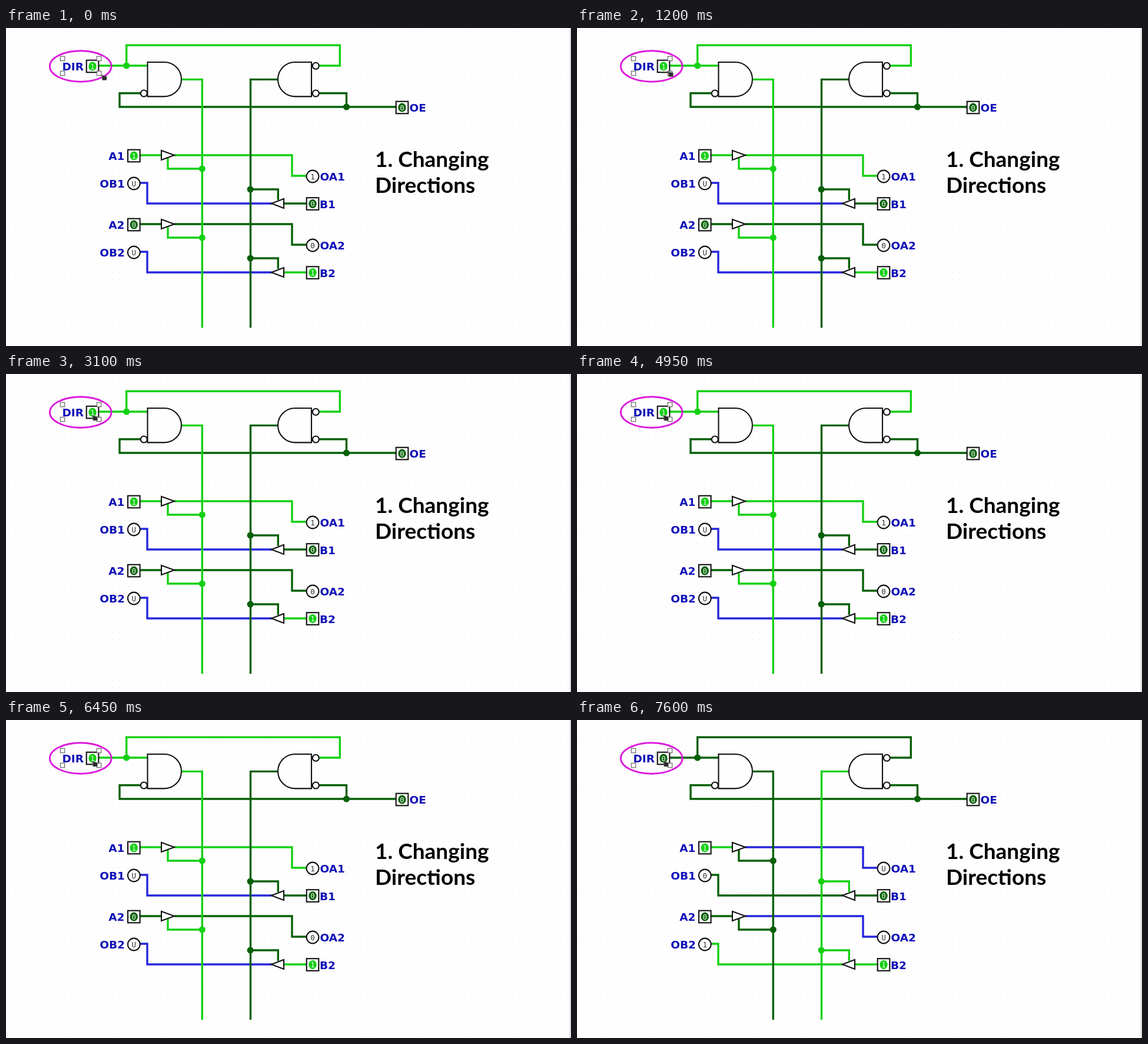
Animation of 960x540 px, one loop 8 s. Source, as an HTML page:

```html
<!DOCTYPE html>
<html lang="en">
<head>
<meta charset="utf-8">
<title>Bus transceiver</title>
<style>
  html, body { margin: 0; width: 100%; height: 100%; overflow: hidden; background: #fefefe; }
  svg { display: block; width: 960px; height: 540px; }
  .wire { fill: none; stroke-width: 3.4; }
  .part { fill: #fefefe; stroke: #111; stroke-width: 2.1; }
  .label { font: bold 18.5px "DejaVu Sans", sans-serif; fill: #1010b8; }
  .value { font: 12.5px "DejaVu Sans Mono", monospace; text-anchor: middle; }
  .title { font: bold 37px Lato, sans-serif; fill: #000; }
</style>
</head>
<body>
<svg viewBox="0 0 960 540">
  <defs>
    <pattern id="grid" x="-.7" y="-.6" width="11.72" height="11.72" patternUnits="userSpaceOnUse">
      <rect x="5.2" y="5.2" width="1.3" height="1.3" fill="#ececec"/>
    </pattern>
  </defs>
  <rect width="960" height="540" fill="url(#grid)"/>
  <rect x="957.5" width="2.5" height="540" fill="#dedede"/>
  <g id="circuit"></g>
  <ellipse cx="126.7" cy="65" rx="52.3" ry="26.2" fill="none" stroke="#dc1cdc" stroke-width="3"/>
  <g id="handles" fill="#fefefe" stroke="#666" stroke-width="1.2"></g>
  <path id="cursor" d="M-4.5 -5L-1 -3.5L4 -2.5V4H-3.5V0Z" fill="#2b2b2b" stroke="#777" stroke-width=".7"/>
  <g class="title">
    <text x="627" y="235.5">1. Changing</text>
    <text x="627" y="279.5">Directions</text>
    <rect x="721" y="260.5" width="11" height="4.2"/>
  </g>
</svg>
<script>
const LOOP = 8000, TOGGLE = 6500;
const COLORS = { 0: '#066006', 1: '#14d014', U: '#2626dc' };
const byId = id => document.getElementById(id);

const wire = (value, d) => `<path class="wire" stroke="${COLORS[value]}" d="${d}"/>`;
const dot = (value, x, y) => `<circle cx="${x}" cy="${y}" r="5.6" fill="${COLORS[value]}"/>`;
const part = d => `<path class="part" d="${d}"/>`;
const bubble = (x, y) => `<circle class="part" cx="${x}" cy="${y}" r="5.5"/>`;
const label = (name, x, y, side) =>
  `<text class="label" x="${x}" y="${y}" text-anchor="${side}">${name}</text>`;
const digit = (value, x, y, color) =>
  `<text class="value" x="${x}" y="${y + 4.6}" fill="${color}">${value}</text>`;

const input = (value, x, y) =>
  `<rect class="part" x="${x - 10.3}" y="${y - 10.3}" width="20.6" height="20.6"/>
   <ellipse cx="${x}" cy="${y}" rx="6.7" ry="7.4" fill="${COLORS[value]}"/>` + digit(value, x, y, '#e8f8e8');
const output = (value, x, y) =>
  `<circle class="part" cx="${x}" cy="${y}" r="10.4"/>` + digit(value, x, y, '#333');

// One bit of the bus: A drives OA when sending, B drives OB when receiving.
function channel(n, y, a, b, send, receive) {
  const oa = send ? a : 'U', ob = receive ? b : 'U';
  return wire(a, `M228 ${y}H264`) + wire(oa, `M286 ${y}H486V${y + 35}H511`)
    + wire(ob, `M227 ${y + 47}H240V${y + 82}H452`) + wire(b, `M472 ${y + 82}H511`)
    + wire(send, `M333.3 ${y + 23}H275V${y + 5}`)
    + wire(receive, `M415.4 ${y + 58}H462.3V${y + 76}`)
    + dot(send, 333.3, y + 23) + dot(receive, 415.2, y + 58)
    + part(`M264 ${y - 8}L286 ${y}L264 ${y + 8}Z`)
    + part(`M472 ${y + 74}L451 ${y + 82}L472 ${y + 90}Z`)
    + input(a, 217.3, y + 1) + output(ob, 217.3, y + 48)
    + output(oa, 521, y + 36) + input(b, 521, y + 82.5)
    + label('A' + n, 201.5, y + 7.7, 'end') + label('OB' + n, 202, y + 54.5, 'end')
    + label('OA' + n, 533.5, y + 43, 'start') + label('B' + n, 533, y + 89.5, 'start');
}

function circuit(dir) {
  const send = dir, receive = 1 - dir;
  return wire(0, 'M229 110.8H193V134H662M531 110.8H578.5V134')
    + wire(dir, 'M158 64H241M204.7 64V29.3H567.3V64H531')
    + channel(1, 216, 1, 0, send, receive)
    + channel(2, 333, 0, 1, send, receive)
    + wire(send, 'M298 87.4H333.3V509')
    + wire(receive, 'M462 87.4H415.5V509')
    + dot(dir, 204.7, 64) + dot(0, 578.5, 134)
    + part('M240.5 58H269A29 29.2 0 0 1 269 116.4H240.5Z')
    + part('M519 58H491A29 29.2 0 0 0 491 116.4H519Z')
    + bubble(234.3, 111) + bubble(526.3, 64.3) + bubble(526.3, 111)
    + input(dir, 147, 65) + label('DIR', 132, 72, 'end')
    + input(0, 673, 135) + label('OE', 685.5, 142, 'start');
}

byId('handles').innerHTML = [96, 158].flatMap(x => [52, 77].map(y =>
  `<rect x="${x - 3.7}" y="${y - 3.7}" width="7.4" height="7.4"/>`)).join('');

// Pointer path: time, x, y
const PATH = [[0, 167, 84.5], [450, 167, 84.5], [1200, 159.3, 78.5], [1650, 151.3, 75], [LOOP, 151.3, 75]];

function pointer(t) {
  const i = PATH.findIndex(p => p[0] > t);
  const [t0, x0, y0] = PATH[i - 1], [t1, x1, y1] = PATH[i];
  const k = (t - t0) / (t1 - t0);
  return [x0 + (x1 - x0) * k, y0 + (y1 - y0) * k];
}

let shown;
function frame() {
  const t = performance.now() % LOOP;
  const dir = t < TOGGLE ? 1 : 0;
  if (dir !== shown) byId('circuit').innerHTML = circuit(shown = dir);
  byId('cursor').setAttribute('transform', `translate(${pointer(t)})`);
  requestAnimationFrame(frame);
}
frame();
</script>
</body>
</html>
```
